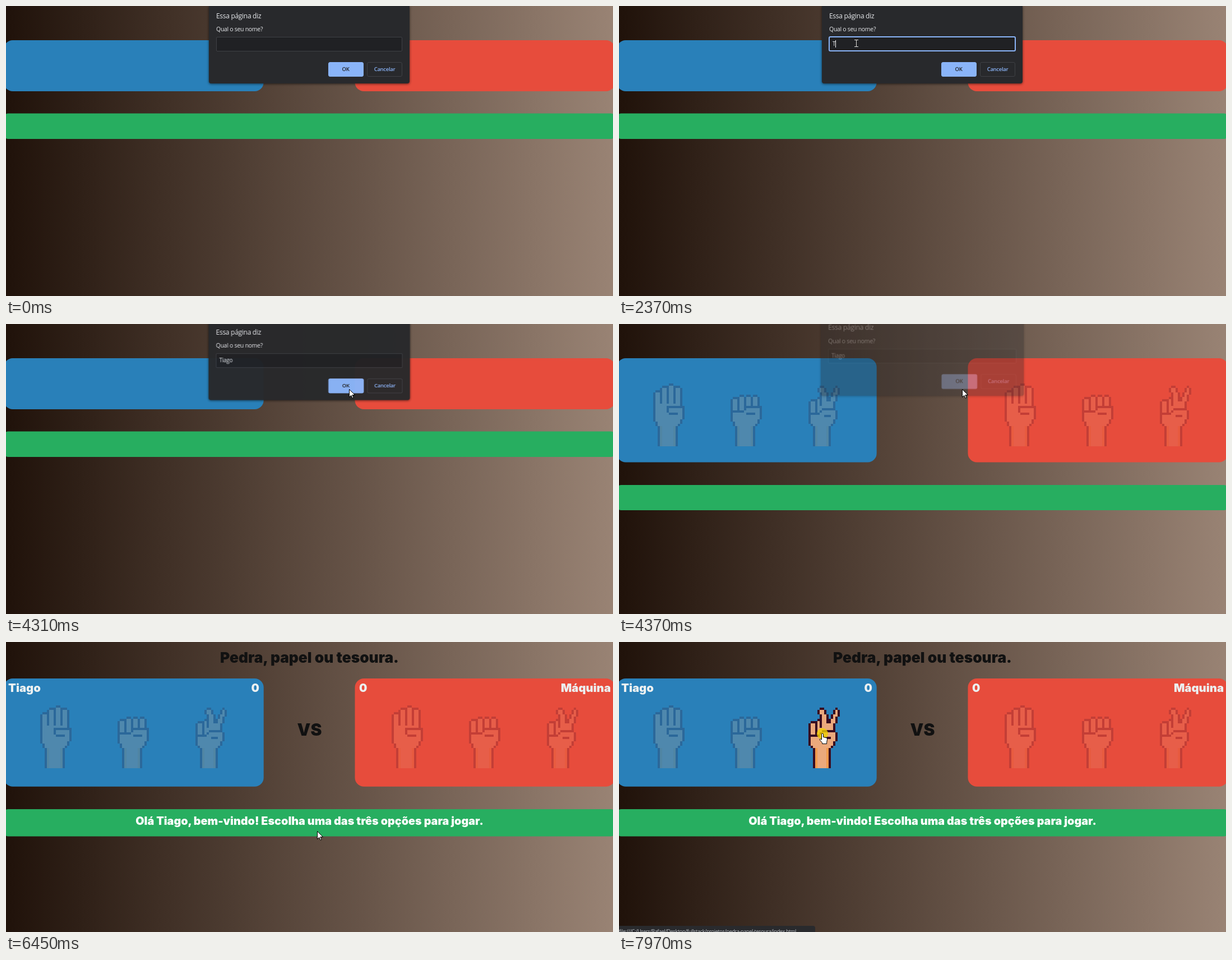
Write an HTML page that moves like this. It is 1083 px wide and 517 px high and loops after 8000 ms.

```html
<!DOCTYPE html>
<html lang="pt-BR">
<head>
<meta charset="utf-8">
<title>Pedra, papel ou tesoura</title>
<style>
html, body { margin: 0; width: 100%; height: 100%; overflow: hidden; }
#stage {
  position: relative; width: 1083px; height: 517px; overflow: hidden; isolation: isolate;
  background: linear-gradient(90deg, #20120a, #998374);
}
#stage * { animation-duration: 8s; animation-iteration-count: infinite; animation-timing-function: step-end; }
#stage > * { position: absolute; left: 0; top: 0; }

/* page */
.panel { y: 61px; height: 91px; animation-name: panel; }
.bar { y: 191.5px; height: 45.5px; fill: #27ae60; animation-name: bar; }
@keyframes panel {
  54.625% { y: 61px; height: 185.5px; }
  55.625%, 100% { y: 65px; height: 192.7px; }
}
@keyframes bar {
  54.625% { y: 287px; height: 45px; }
  55.625%, 100% { y: 298px; height: 48.5px; }
}
.hands { opacity: 0; animation-name: hands; }
@keyframes hands {
  54.625% { opacity: 1; transform: translateY(-7px); }
  55.625%, 100% { opacity: 1; transform: none; }
}
.hand { opacity: .2; }
.picked { animation-name: pick; }
@keyframes pick { 92.75%, 100% { opacity: 1; } }
.skin { fill: #eba97c; }
.shade { fill: #f19b4c; }
.line { fill: none; stroke: #380a20; }
.text { font: 900 20.3px Inter, sans-serif; fill: #ecf0f1; opacity: 0; animation-name: text; }
@keyframes text { 55.625%, 100% { opacity: 1; } }
.dark { fill: #111; }
.mid { text-anchor: middle; }
.end { text-anchor: end; }

/* dialog */
#dialog {
  left: 362px; width: 358px; height: 138px; border-radius: 0 0 4px 4px;
  background: #28292c; color: #e8eaed; box-shadow: 0 1px 4px rgba(0, 0, 0, .6);
  font: 10.5px "Open Sans", "Noto Sans", sans-serif; letter-spacing: -.3px; white-space: nowrap;
  transform-origin: 50% 0; animation-name: close;
}
@keyframes close {
  52.75% { transform: translateY(-1px); opacity: 1; }
  53.875% { transform: translateY(-3px) scale(1.003); opacity: .98; }
  54.625% { transform: translateY(-11.7px) scale(1.012); opacity: .33; }
  55.625%, 100% { opacity: 0; }
}
#dialog > * { position: absolute; box-sizing: border-box; }
.head { left: 13px; top: 7.5px; font-size: 12px; line-height: 20px; }
.ask { left: 13px; top: 31px; line-height: 20px; }
.field { left: 13px; top: 55px; width: 332px; height: 26px; background: #202124; border: 1px solid #3f4145; border-radius: 2px; }
.ring { left: 12px; top: 54px; width: 334px; height: 27px; border: 2px solid #8ab4f8; border-radius: 3px; opacity: 0; animation-name: ring; }
@keyframes ring { 19.5% { opacity: 1; } 51.375%, 100% { opacity: 0; } }
.typed { left: 19px; top: 61px; height: 13px; line-height: 13px; font-size: 10px; display: flex; }
.typed::before { content: ""; animation: type 8s step-end infinite; }
@keyframes type {
  0% { content: ""; }
  29.625% { content: "T"; }
  31.25% { content: "Ti"; }
  34.625% { content: "Tia"; }
  35.875% { content: "Tiag"; }
  37.125%, 100% { content: "Tiago"; }
}
.caret { width: 1px; height: 13px; background: #fff; opacity: 0; animation-name: caret; }
@keyframes caret {
  20.375% { opacity: 1; }
  26.125% { opacity: 0; }
  29.625% { opacity: 1; }
  43.75% { opacity: 0; }
  50.375% { opacity: 1; }
  51.375%, 100% { opacity: 0; }
}
.btn {
  top: 99.5px; width: 63px; height: 26px; border: 1px solid #3f4145; border-radius: 3px;
  font-size: 9.5px; font-weight: 600; line-height: 24px; text-align: center; color: #8ab4f8;
}
.ok { left: 212.5px; background: #8ab4f8; border-color: #8ab4f8; color: #202124; }
.cancel { left: 282px; }

/* link address */
#stage > .status {
  top: 506px; width: 350px; height: 20px; border-radius: 0 4px 0 0; background: #292a2d; color: #bdc1c6;
  font: 9px/20px "Open Sans", "Noto Sans", sans-serif; letter-spacing: -.3px; white-space: nowrap;
  opacity: 0; animation-name: status;
}
@keyframes status { 94.5%, 100% { opacity: 1; } }

/* mouse */
.mouse { width: 1px; height: 1px; overflow: visible; opacity: 0; }
.arrow { animation-name: move, arrow; }
.ibeam { animation-name: move, ibeam; mix-blend-mode: difference; }
.pointer { animation-name: move, pointer; }
.mouse path { fill: #fff; stroke: #000; }
.mouse .beam { fill: none; stroke: #fff; }
.click { fill: #f0d000; fill-opacity: .8; opacity: 0; animation-name: click; }
@keyframes arrow {
  4.125% { opacity: 1; } 13.75% { opacity: 0; }
  45.5% { opacity: 1; } 65.75% { opacity: 0; }
  67.75% { opacity: 1; } 85.3125% { opacity: 0; }
  86.25% { opacity: 1; } 92.75%, 100% { opacity: 0; }
}
@keyframes ibeam {
  13.75% { opacity: 1; } 45.5% { opacity: 0; }
  65.75% { opacity: 1; } 67.75% { opacity: 0; }
  85.3125% { opacity: 1; } 86.25%, 100% { opacity: 0; }
}
@keyframes pointer { 92.75%, 100% { opacity: 1; } }
@keyframes click { 99.625%, 100% { opacity: 1; } }
@keyframes move {
  0% { transform: translate(921px, 435px); }
  4.125% { transform: translate(921px, 435px); animation-timing-function: steps(7); }
  10.25% { transform: translate(626px, 247px); animation-timing-function: steps(4); }
  13.75% { transform: translate(434px, 67px); }
  14.5% { transform: translate(423px, 66px); }
  43.75% { transform: translate(440px, 70px); animation-timing-function: steps(7); }
  50% { transform: translate(612px, 116px); }
  61.25% { transform: translate(600px, 132px); animation-timing-function: steps(6); }
  66.8% { transform: translate(382px, 322px); animation-timing-function: steps(3); }
  69.625% { transform: translate(475px, 338px); }
  72.125% { transform: translate(472px, 338px); animation-timing-function: steps(2); }
  73.825% { transform: translate(464px, 337px); animation-timing-function: steps(6); }
  78.925% { transform: translate(584px, 335px); animation-timing-function: steps(2); }
  80.625% { transform: translate(555px, 337px); }
  81.5% { transform: translate(548px, 337px); }
  82.5% { transform: translate(562px, 337px); animation-timing-function: steps(3); }
  85.3125% { transform: translate(643px, 330px); animation-timing-function: steps(7); }
  91.875% { transform: translate(365px, 185px); }
  92.75% { transform: translate(364px, 178px); animation-timing-function: steps(4); }
  96.25% { transform: translate(363px, 166px); }
  97.125%, 100% { transform: translate(363px, 163px); }
}
</style>
</head>
<body>
<div id="stage">
  <svg width="1083" height="517">
    <defs>
      <g id="paper">
        <path class="skin" d="M1 4H4V2H7V1H9V2H12V10H13V16H12V18H11V19H10V28H3V19H2V17H1z"/>
        <path class="shade" d="M3 19h1v9h-1zM9 19h1v9h-1z"/>
        <path class="line" d="M1 3.5h2M4 1.5h2M7 .5h2M10 1.5h2M3.5 2v7M6.5 1v8M9.5 1v8M12.5 2v8M6 10.5h8M6.5 11v2M7 13.5h4M.5 4v13M1.5 17v2M2.5 19v9M13.5 11v5M12.5 16v2M11.5 18v1M10.5 19v9"/>
      </g>
      <g id="rock">
        <path class="skin" d="M1 2H3V1H12V5H13V11H12V13H11V14H10V23H3V14H2V12H1z"/>
        <path class="shade" d="M3 14h1v9h-1zM9 14h1v9h-1z"/>
        <path class="line" d="M1 1.5h2M4 .5h2M7 .5h2M10 .5h2M3.5 1v6M6.5 1v6M9.5 1v4M12.5 1v4M6 5.5h8M1 7.5h5M7 8.5h4M.5 2v10M1.5 12v2M2.5 14v9M13.5 6v5M12.5 11v2M11.5 13v1M10.5 14v9"/>
      </g>
      <g id="scissors">
        <path class="skin" d="M1 7H4V6H6V3H5V1H7V3H8V7H10V5H11V3H12V1H13V4H12V7H11V10H12V15H11V17H10V18H9V27H3V18H2V17H1z"/>
        <path class="shade" d="M3 18h1v9h-1zM8 18h1v9h-1z"/>
        <path class="line" d="M5 .5h2M4.5 1v2M5.5 3v6M7.5 1v2M8.5 3v4M12 .5h1M11.5 1v2M10.5 3v2M9.5 5v2M13.5 1v3M12.5 4v3M11.5 7v3M1 6.5h2M4 5.5h1M3.5 6v6M6 10.5h6M5.5 11v1M1 12.5h4M7 13.5h3M.5 7v10M1.5 17v1M2.5 18v9M12.5 11v4M11.5 15v2M10.5 17v1M9.5 18v9"/>
      </g>
    </defs>
    <rect class="panel" x="-4" width="463.7" rx="16" fill="#2980b9"/>
    <rect class="panel" x="622.5" width="464" rx="16" fill="#e74c3c"/>
    <rect class="bar" x="-4" width="1091" rx="8"/>
    <g class="hands" shape-rendering="crispEdges">
      <g class="hand"><use href="#paper" transform="translate(61 113) scale(4)"/></g>
      <g class="hand"><use href="#rock" transform="translate(199 133) scale(4)"/></g>
      <g class="hand picked"><use href="#scissors" transform="translate(338 117) scale(4)"/></g>
      <g class="hand"><use href="#paper" transform="translate(688 113) scale(4)"/></g>
      <g class="hand"><use href="#rock" transform="translate(826 133) scale(4)"/></g>
      <g class="hand"><use href="#scissors" transform="translate(965 117) scale(4)"/></g>
    </g>
    <g class="text">
      <text class="dark mid" x="541.5" y="37" font-size="26.3">Pedra, papel ou tesoura.</text>
      <text x="4" y="89">Tiago</text>
      <text class="end" x="452" y="89">0</text>
      <text x="630" y="89">0</text>
      <text class="end" x="1079" y="89">Máquina</text>
      <text class="dark mid" x="541.5" y="167" font-size="30">VS</text>
      <text class="mid" x="541.5" y="326" font-size="19.8" fill="#fff">Olá Tiago, bem-vindo! Escolha uma das três opções para jogar.</text>
    </g>
  </svg>

  <div class="status">file:///C:/Users/Rafael/Desktop/fullstack/projetos/pedra-papel-tesoura/index.html</div>

  <div id="dialog">
    <div class="head">Essa página diz</div>
    <div class="ask">Qual o seu nome?</div>
    <div class="field"></div>
    <div class="ring"></div>
    <div class="typed"><i class="caret"></i></div>
    <div class="btn ok">OK</div>
    <div class="btn cancel">Cancelar</div>
  </div>

  <svg class="mouse arrow"><path d="M.5 .5v14l3.3-3.2 2.2 5 2-.9-2.1-4.9h4.6z"/></svg>
  <svg class="mouse ibeam"><path class="beam" d="M-3-5.5h7M.5-5v11M-3 6.5h7"/></svg>
  <svg class="mouse pointer">
    <circle class="click" cy=".5" r="10"/>
    <path d="M-1.5 1.5a1.5 1.5 0 0 1 3 0V6.5l5.5 1.2q1.8.5 1.6 2.5l-1 6V18.500h-8v-2L-4.800 11.500q-.5-2 1.500-1.600L-1.500 11z"/>
  </svg>
</div>
</body>
</html>
```
